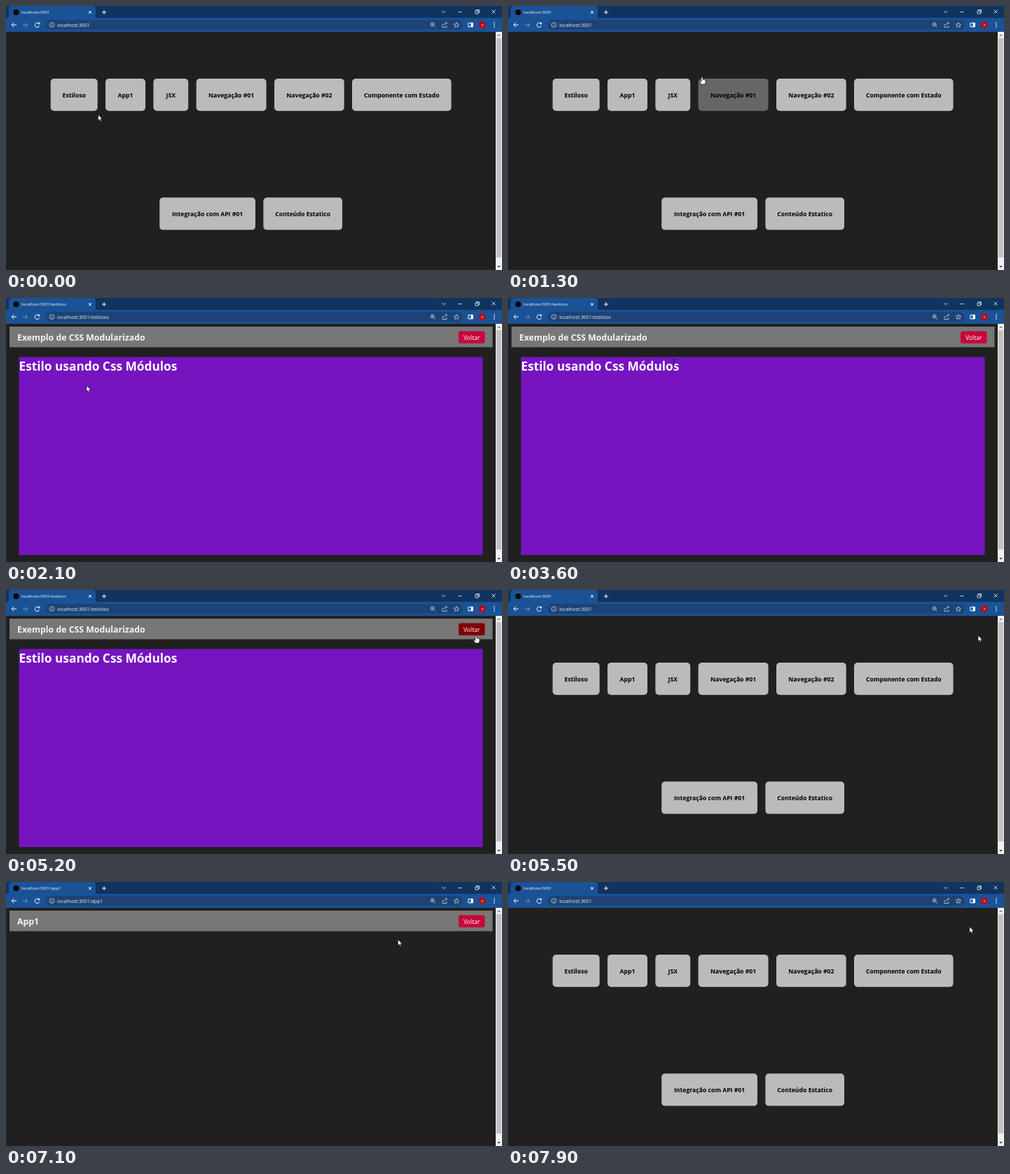
These frames come from a looping animation (708 px wide and 378 px high, 8000 ms). An HTML page:

```html
<!DOCTYPE html>
<html lang="pt">
<head>
<meta charset="utf-8">
<title>localhost:3001</title>
<style>
  html, body { margin: 0; width: 100%; height: 100%; overflow: hidden; background: #202020; }
  svg { display: block; width: 100vw; height: 100vh; }
  text { font-family: "Open Sans", "Noto Sans", sans-serif; white-space: pre; }
  .bold { font-weight: 700; }
  .icon { fill: none; stroke: #fff; stroke-width: 1; }
  .soft { stroke: #c5d3e6; stroke-width: .8; }
  .card rect { fill: #bbb; }
  .card.hover rect { fill: #666; }
  .card text { font-size: 8.68px; font-weight: 700; text-anchor: middle; }
  .back rect { fill: #c8033c; }
  .back.hover rect { fill: #800000; }
  .cursor { stroke: #000; stroke-width: .6; fill: #fff; stroke-linejoin: round; }
</style>
</head>
<body>
<svg viewBox="0 0 708 378" preserveAspectRatio="none">
  <rect width="708" height="18" fill="#10345f"/>
  <path d="M0 18Q4 18 4 14V4Q4 0 8 0H124Q128 0 128 4V14Q128 18 132 18Z" fill="#1a5296"/>
  <rect y="17" width="708" height="20" fill="#1a5296"/>
  <rect x="56" y="20" width="596" height="14" rx="7" fill="#1d4375"/>

  <circle cx="14.5" cy="9" r="4" fill="#000"/>
  <text id="tab" x="22" y="11" font-size="5.97" fill="#fff"></text>
  <text id="url" y="29.6" x="73.3" font-size="6.88" fill="#e8eef6"></text>

  <g class="icon">
    <path d="M118 7l4 4m0-4l-4 4M137 9h6m-3-3v6M15 27H8m3.3-3.3L8 27l3.3 3.3"/>
    <path d="M24 27h7m-3.3-3.3L31 27l-3.3 3.3" stroke="#7798c3"/>
    <path d="M47 25a3.3 3.3 0 1 0 .7 3.2M47.8 23.2v2.4h-2.4"/>
    <path d="M622 7l2.7 2.6L627.400 7M645.500 8.500h5M670 7h4v4h-4zM671.500 7V5.500h4v4H674M693.500 5.500l5 5m0-5l-5 5" stroke-width=".8"/>
    <path d="M660 24.300h6.500v5.500H660z"/>
  </g>
  <rect x="663.500" y="24" width="3.200" height="6" fill="#fff"/>
  <g class="icon soft">
    <circle cx="65.500" cy="27" r="3.400"/>
    <path d="M65.500 26.500v2.500m0-4v.8"/>
    <circle cx="608.700" cy="26.300" r="2.500"/>
    <path d="M610.500 28.200l2.400 2.400M607.400 26.300h2.600m-1.300-1.300v2.600"/>
    <path d="M623 26v4.500h6V28M625 28q0-3.500 4.500-3.500m-1.800-1.800l1.900 1.800-1.900 1.800"/>
    <path id="star"/>
  </g>
  <circle cx="680" cy="27" r="5" fill="#b80b18"/>
  <text x="680" y="28.700" font-size="5" fill="#fff" text-anchor="middle">n</text>
  <path d="M697 23.500v1.500m0 1.300v1.500m0 1.300v1.500" stroke="#fff" stroke-width="1.400"/>

  <rect y="37" width="708" height="341" fill="#202020"/>
  <g id="home"></g>

  <g id="inner">
    <rect x="5" y="41" width="689.500" height="29.500" fill="#777"/>
    <text id="heading" class="bold" x="16" y="61.300" font-size="12.300" fill="#f4f4f4"></text>
    <g id="back" class="back">
      <rect x="646" y="47.500" width="37.500" height="17.500" rx="2.500"/>
      <text x="664.700" y="59.800" font-size="8.600" fill="#fff" text-anchor="middle">Voltar</text>
    </g>
    <g id="purple">
      <rect x="18.500" y="84.500" width="662" height="283.500" fill="#7614c0"/>
      <text class="bold" x="18.500" y="104" font-size="17.300" fill="#fff">Estilo usando Css Módulos</text>
    </g>
  </g>

  <rect x="699" y="37" width="9" height="341" fill="#f1f1f1"/>
  <rect x="700" y="46" width="7" height="314" fill="#c1c1c1"/>
  <path d="M701 43l2.500-2.800L706 43z" fill="#888"/>
  <path d="M701 372l2.500 2.800L706 372z" fill="#505050"/>

  <g id="pointer" class="cursor">
    <path id="arrow" d="M0 0V8.600L2 6.800L3.400 9.800L4.800 9.100L3.500 6.300L6 6.100Z"/>
    <path id="hand" d="M-1 1Q0-.4 1 1V4.200Q2 3.500 2.600 4.500Q3.600 4 4 5Q5 4.800 5 5.900V8.300L4 11H-1L-3.600 7.300Q-3.300 5.600-1.900 6.500L-1 7.500Z"/>
    <path id="beam" d="M-1.800 0Q0 0 0 1Q0 0 1.800 0M0 1V8M-1.800 9Q0 9 0 8Q0 9 1.800 9" fill="none" stroke="#111" stroke-width=".8"/>
  </g>
</svg>

<script>
const LOOP = 8000, STEP = 100;
const $ = id => document.getElementById(id);

// label, left, width, top
const cards = [
  ["Estiloso", 63.7, 67, 104],
  ["App1", 142, 57, 104],
  ["JSX", 210.4, 49.8, 104],
  ["Navegação #01", 271.6, 100, 104],
  ["Navegação #02", 383, 99.7, 104],
  ["Componente com Estado", 494, 141.6, 104],
  ["Integração com API #01", 219.2, 136.8, 274.3],
  ["Conteúdo Estatico", 367.4, 112.6, 274.3]
];
const CARD_HEIGHT = 46.3;

const pages = {
  home: { path: "" },
  styled: { path: "/estiloso", heading: "Exemplo de CSS Modularizado" },
  app: { path: "/app1", heading: "App1" }
};
const visits = [[0, "home"], [2100, "styled"], [5400, "home"], [6500, "app"], [7800, "home"]];

// time, x, y of the pointer tip
const track = [
  [0, 131.5, 155.5], [200, 84, 264], [300, 180, 165], [400, 290, 58], [500, 284, 72],
  [1000, 284, 72], [1300, 277, 101], [1600, 190, 168], [1900, 115, 125.500],
  [2100, 115, 125.5], [2500, 430, 300], [2900, 687, 42], [3100, 674, 58],
  [3300, 674, 58], [3600, 237, 88], [4200, 122, 94], [4300, 122, 94],
  [4900, 690, 72], [5200, 671, 65], [5500, 671, 65], [6200, 192.5, 124],
  [6300, 193.3, 125], [6400, 193.3, 125], [7300, 664, 70], [7500, 660, 60],
  [7700, 660, 60], [7900, 658.8, 64], [8000, 658.8, 64]
];

$("home").innerHTML = cards.map(([label, x, w, y]) =>
  `<g class="card"><rect x="${x}" y="${y}" width="${w}" height="${CARD_HEIGHT}" rx="5"/>
   <text x="${x + w / 2}" y="${y + 26.8}">${label}</text></g>`).join("");
const cardNodes = [...$("home").children];

$("star").setAttribute("d", "M" + Array.from({ length: 10 }, (_, i) => {
  const r = i % 2 ? 1.7 : 3.9, a = i * Math.PI / 5;
  return `${(643 + r * Math.sin(a)).toFixed(2)} ${(27.3 - r * Math.cos(a)).toFixed(2)}`;
}).join("L") + "Z");

function pointerAt(t) {
  const i = track.findIndex(key => key[0] > t);
  const [t0, x0, y0] = track[i - 1], [t1, x1, y1] = track[i];
  const k = (t - t0) / (t1 - t0);
  return [x0 + (x1 - x0) * k, y0 + (y1 - y0) * k];
}

const show = (node, on) => node.setAttribute("display", on ? "inline" : "none");
const inside = (px, py, x, y, w, h) => px >= x && px <= x + w && py >= y - 3 && py <= y + h;

function render(t) {
  const name = visits.filter(visit => visit[0] <= t).pop()[1];
  const page = pages[name], home = name === "home";
  const [x, y] = pointerAt(t);
  const address = "localhost:3001" + page.path;

  $("tab").textContent = $("url").textContent = address;
  $("heading").textContent = page.heading || "";
  show($("home"), home);
  show($("inner"), !home);
  show($("purple"), name === "styled");

  let kind = "arrow";
  cards.forEach(([, left, w, top], i) => {
    const hover = home && inside(x, y, left, top, w, CARD_HEIGHT);
    cardNodes[i].classList.toggle("hover", hover);
    if (hover) kind = "hand";
  });
  const onBack = !home && inside(x, y, 646, 47.5, 37.5, 17.5);
  $("back").classList.toggle("hover", onBack);
  if (onBack) kind = "hand";
  // A freshly opened page keeps the plain arrow until the pointer moves.
  if (name === "styled" && inside(x, y, 18, 88, 228, 20)) kind = "beam";

  for (const id of ["arrow", "hand", "beam"]) show($(id), id === kind);
  $("pointer").setAttribute("transform", `translate(${x.toFixed(1)} ${y.toFixed(1)})`);
}

const start = performance.now();
function tick() {
  const t = (performance.now() - start) % LOOP;
  render(Math.floor(t / STEP) * STEP);
  requestAnimationFrame(tick);
}
tick();
</script>
</body>
</html>
```
